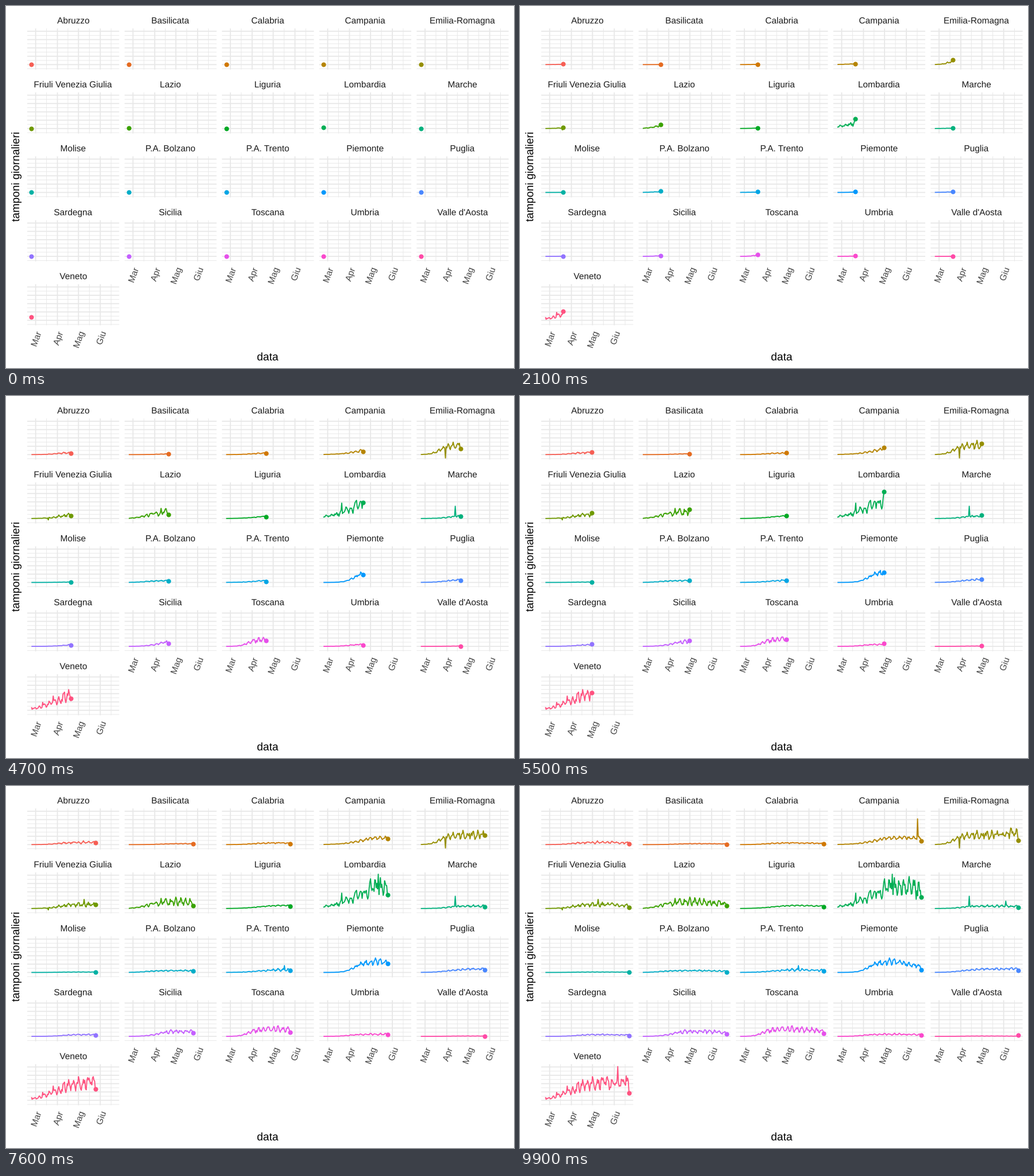
A matplotlib script that plays this animation: 885 px wide and 632 px high, repeating every 10 s.

```python
import numpy as np
import matplotlib
import matplotlib.pyplot as plt
from matplotlib.animation import FuncAnimation
from matplotlib.collections import LineCollection
from matplotlib.patches import PathPatch
from matplotlib.textpath import TextPath
from matplotlib.transforms import Affine2D

matplotlib.rcParams["font.family"] = "Liberation Sans"

W, H, DPI = 885, 632, 100
PX = 72 / DPI                       # points per pixel
FRAMES, LAST_DAY = 100, 119
X0, DAY_W = 44.3, 145.6 / LAST_DAY  # first day and width of a day
COL_W, ROW_H = 169.6, 111.6
ZERO, STEP = 102.3, 14.55           # zero line and 5000-unit step
LEFT, RIGHT, TOP, BOTTOM = 37.0, 197.2, 39.3, 111.0
MONTHS = {"Mar": 6, "Apr": 37, "Mag": 67, "Giu": 98}

DAYS = np.arange(LAST_DAY + 1)
rng = np.random.default_rng(20)
regions = []


def add(name, level, mid=38, pace=9, tail=0.75, swing=0.25, spikes=None):
    """Logistic growth, late decline, weekly cycle and noise; heights in pixels."""
    trend = level / (1 + np.exp((mid - DAYS) / pace))
    trend *= np.interp(DAYS, [80, LAST_DAY], [1, tail])
    week = np.cos(2 * np.pi * (DAYS - 4) / 7)
    y = trend * (1 + swing * (week + rng.uniform(-1, 1, DAYS.size)))
    y[-1] *= 0.65                   # the last day is a slow Monday
    for day, height in (spikes or {}).items():
        y[day] = height
    regions.append((name, y))


add("Abruzzo", 4, swing=0.35)
add("Basilicata", 1.6, mid=45)
add("Calabria", 3)
add("Campania", 14, mid=54, pace=14, swing=0.2, spikes={114: 45})
add("Emilia-Romagna", 17, mid=27, pace=6, tail=1.2, spikes={35: -6, 108: 29})
add("Friuli Venezia Giulia", 7, swing=0.35, spikes={24: -2.5, 75: 16})
add("Lazio", 12, mid=27, tail=0.65, swing=0.35)
add("Liguria", 5.5, mid=45, pace=12, swing=0.12)
add("Lombardia", 43, mid=46, pace=18, swing=0.3, spikes={26: 27, 78: 60, 102: 56})
add("Marche", 4.5, swing=0.3, spikes={49: 21.5, 101: 13})
add("Molise", 0.8)
add("P.A. Bolzano", 3.2, mid=25)
add("P.A. Trento", 5, mid=48, pace=13, swing=0.3, spikes={83: 12})
add("Piemonte", 19, mid=45, pace=7, tail=0.55, swing=0.18)
add("Puglia", 6, mid=40, pace=11, tail=1.1, swing=0.2)
add("Sardegna", 3.2, mid=45)
add("Sicilia", 9, mid=42)
add("Toscana", 12.5, mid=32, pace=6)
add("Umbria", 3.8)
add("Valle d'Aosta", 0.6, spikes={LAST_DAY: 2.3})
add("Veneto", 32, mid=34, pace=14, tail=0.95, swing=0.25,
    spikes={0: 5.5, 16: 14, 31: 25, 103: 59})


def hue(h, lum=65, chroma=100):
    """Polar LUV colour as RGB, darkened by the display gamma."""
    a = np.radians(h)
    Y = ((lum + 16) / 116) ** 3
    u = chroma * np.cos(a) / (13 * lum) + 0.1978398
    v = chroma * np.sin(a) / (13 * lum) + 0.4683363
    X = 9 * Y * u / (4 * v)
    Z = -X / 3 - 5 * Y + 3 * Y / v
    lin = np.array([3.240479 * X - 1.537150 * Y - 0.498535 * Z,
                    -0.969256 * X + 1.875992 * Y + 0.041556 * Z,
                    0.055648 * X - 0.204043 * Y + 1.057311 * Z])
    lin = np.clip(lin, 0, 1)
    rgb = np.where(lin > 0.00304, 1.055 * lin ** (1 / 2.4) - 0.055, 12.92 * lin)
    return np.clip(rgb, 0, 1) ** 1.3


fig = plt.figure(figsize=(W / 100, H / 100), dpi=DPI, facecolor="white")
ax = fig.add_axes([0, 0, 1, 1])
ax.set_xlim(0, W)
ax.set_ylim(H, 0)
ax.axis("off")


def label(x, y, s, size, color, align=0.5, angle=0):
    """Text as outlines, so that it sits at exact sub-pixel positions."""
    path = TextPath((0, 0), s, size=size)
    box = path.get_extents()
    place = (Affine2D().translate(-box.x0 - align * box.width, 0).scale(1, -1)
             .rotate_deg(-angle).translate(x, y))
    ax.add_patch(PathPatch(place.transform_path(path), fc=color, lw=0, snap=False))


def grid(dx, dy, xs, ys, width):
    segs = [[(dx + LEFT, dy + y), (dx + RIGHT, dy + y)] for y in ys]
    segs += [[(dx + x, dy + TOP), (dx + x, dy + BOTTOM)] for x in xs]
    ax.add_collection(LineCollection(segs, colors="#e8e8e8", linewidths=width * PX,
                                     capstyle="butt", snap=False, zorder=1),
                      autolim=False)


month_x = X0 + DAY_W * np.array(list(MONTHS.values()))
mid_x = np.append((month_x[1:] + month_x[:-1]) / 2, month_x[-1] + 18.9)
tick_y = ZERO - STEP * np.arange(5)

lines, dots = [], []
for i, (name, y) in enumerate(regions):
    row, col = divmod(i, 5)
    dx, dy = col * COL_W, row * ROW_H
    grid(dx, dy, mid_x, tick_y + STEP / 2, 0.93)
    grid(dx, dy, month_x, tick_y, 1.85)
    label(dx + 117.1, dy + 30.5, name, 15.4, "#1a1a1a")
    if i + 5 >= len(regions):
        for x, m in zip(month_x, MONTHS):
            label(dx + x + 10, dy + 124.7, m, 15.4, "#464646", align=1, angle=70)
    color = hue(15 + 360 * i / len(regions))
    lines += ax.plot([], [], color=color, lw=1.85 * PX, zorder=3, snap=False,
                     solid_capstyle="butt", solid_joinstyle="round")
    dots += ax.plot([], [], "o", color=color, ms=8.1 * PX, mew=0, zorder=4,
                    snap=False)

label(456.2, 618.7, "data", 19.2, "black")
label(23, 298.8, "tamponi giornalieri", 19.2, "black", angle=90)


def update(frame):
    t = frame * LAST_DAY / (FRAMES - 1)
    seen = np.append(DAYS[DAYS < t], t)
    for i, (_, y) in enumerate(regions):
        row, col = divmod(i, 5)
        px = X0 + col * COL_W + DAY_W * seen
        py = ZERO + row * ROW_H - np.interp(seen, DAYS, y)
        lines[i].set_data(px, py)
        dots[i].set_data(px[-1:], py[-1:])
    return lines + dots


anim = FuncAnimation(fig, update, frames=FRAMES, interval=100,
                     repeat=True, repeat_delay=0, blit=False)
plt.show()
```
